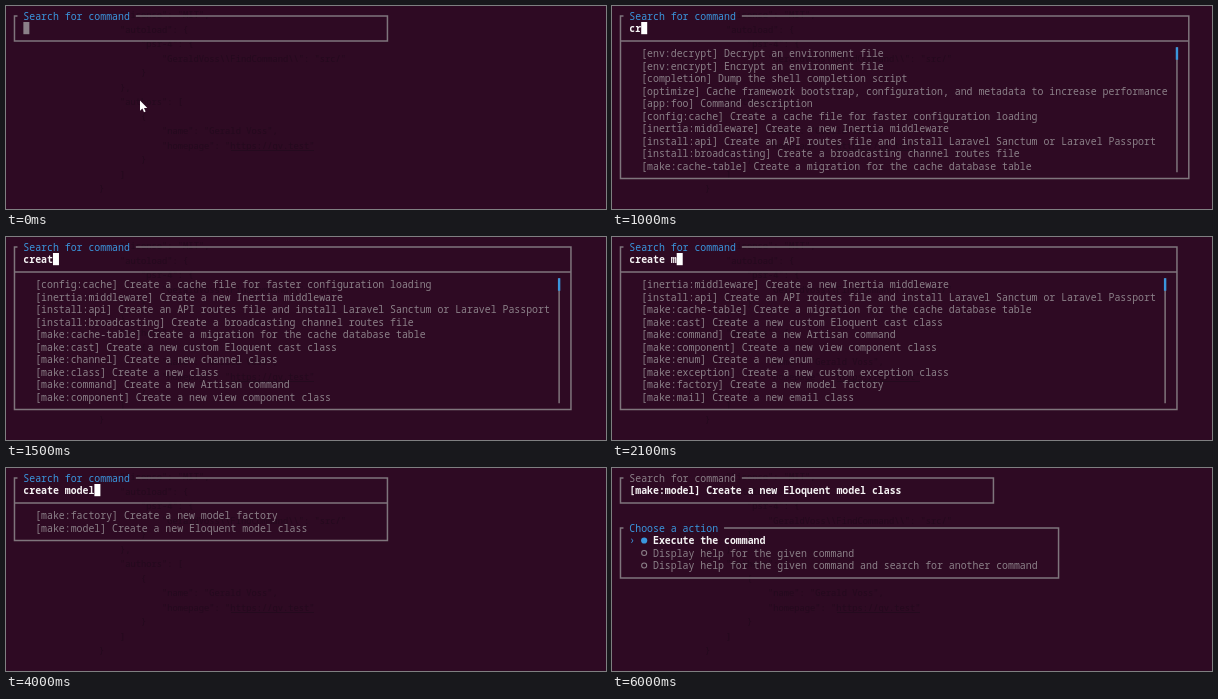
Animation, 600 px wide and 203 px high, one loop 6.5 s. Source, as an HTML page:

```html
<!DOCTYPE html>
<html lang="en">
<head>
<meta charset="utf-8">
<title>Search for command</title>
<style>
  html, body { margin: 0; width: 100%; height: 100%; overflow: hidden; background: #2e0a23; }
  svg { display: block; width: 600px; height: 203px; }
  text { font: 500 9.87px "Noto Sans Mono", "DejaVu Sans Mono", monospace; white-space: pre; }
  .dim { fill: #8b8088; }
  .blue { fill: #3a96dd; }
  .white { fill: #f6f4f5; font-weight: 700; }
  .ghost { fill: #240a1e; font-size: 8.77px; }
  .line { fill: none; stroke: #7f757c; stroke-width: 1.5; }
</style>
</head>
<body>
<svg id="stage" viewBox="0 0 600 203"></svg>
<script>
const LOOP = 6500, CELL = 5.92, ROW = 12.5, VISIBLE = 10;
const stage = document.getElementById('stage');

const commands = `clear-compiled|Remove the compiled class file
completion|Dump the shell completion script
docs|Access the Laravel documentation
optimize|Cache framework bootstrap, configuration, and metadata to increase performance
app:foo|Command description
auth:clear-resets|Flush expired password reset tokens
cache:clear|Flush the application cache
cache:forget|Remove an item from the cache
cache:prune-stale-tags|Prune stale cache tags from the cache (Redis only)
channel:list|List all registered private broadcast channels
config:cache|Create a cache file for faster configuration loading
env:decrypt|Decrypt an environment file
env:encrypt|Encrypt an environment file
inertia:middleware|Create a new Inertia middleware
install:api|Create an API routes file and install Laravel Sanctum or Laravel Passport
install:broadcasting|Create a broadcasting channel routes file
make:cache-table|Create a migration for the cache database table
make:cast|Create a new custom Eloquent cast class
make:channel|Create a new channel class
make:class|Create a new class
make:command|Create a new Artisan command
make:component|Create a new view component class
make:enum|Create a new enum
make:exception|Create a new custom exception class
make:factory|Create a new model factory
make:mail|Create a new email class
make:model|Create a new Eloquent model class`.split('\n').map(s => s.split('|'));

const actions = [
  'Execute the command',
  'Display help for the given command',
  'Display help for the given command and search for another command'
];

// Code showing faintly through the terminal: [indent, text]
const code = [
  [1, '"license": "MIT",'], [1, '"autoload": {'], [2, '"psr-4": {'],
  [3, '"GeraldVoss\\\\FindCommand\\\\": "src/"'], [2, '}'], [1, '},'],
  [1, '"authors": ['], [2, '{'], [3, '"name": "Gerald Voss",'],
  [3, '"homepage": "https://gv.test"'], [2, '}'], [1, ']'], [0, '}']
];

const steps = [
  { at: 0, query: '', pointer: true },
  { at: 600, query: 'c', right: 98 },
  { at: 900, query: 'cr' },
  { at: 1100, query: 'cre' },
  { at: 1500, query: 'creat' },
  { at: 1700, query: 'create' },
  { at: 1800, query: 'create ' },
  { at: 2000, query: 'create m' },
  { at: 2300, query: 'create mo' },
  { at: 2400, query: 'create mod' },
  { at: 2900, query: 'create mode' },
  { at: 3400, query: 'create model' },
  { at: 4100, query: 'create model', pick: 0 },
  { at: 4300, query: 'create model', pick: 1 },
  { at: 4800, done: true }
];

const colX = c => c * CELL - 0.4;
const midX = c => colX(c + 0.5);
const rowY = r => 10 + r * ROW;
const label = ([name, about]) => `[${name}] ${about}`;
const text = (col, row, str, cls) =>
  `<text x="${colX(col)}" y="${rowY(row) + 3.5}" class="${cls}">${str}</text>`;
const path = (d, extra = '') => `<path class="line" d="${d}" ${extra}/>`;

// Name matches come before description matches
function search(query) {
  const words = query.toLowerCase().split(' ').filter(Boolean);
  if (!words.length) return [];
  const hit = s => words.every(w => s.toLowerCase().includes(w));
  const byName = commands.filter(c => hit(c[0]));
  const byAbout = commands.filter(c => !hit(c[0]) && hit(c[1]));
  return [...byName, ...byAbout];
}

function box(top, bottom, right, title, cls) {
  const l = midX(1), r = midX(right), y = rowY(top);
  return path(`M${l + 3} ${y}H${l}V${rowY(bottom)}H${r}V${y}H${colX(4 + title.length)}`) +
    text(3, top, title, cls);
}

function backdrop() {
  const lines = code.map(([indent, str], i) =>
    `<text class="ghost" x="${93 + indent * 21}" y="${12 + i * 14.5}">${str}</text>`);
  return lines.join('') + '<path d="M225 144.5H308" stroke="#240a1e"/>';
}

function searchView({ query, pick, right, pointer }) {
  const found = search(query), shown = found.slice(0, VISIBLE);
  const longest = Math.max(0, ...shown.map(c => label(c).length));
  const edge = right || Math.max(64, longest + 8);
  let out = box(0, shown.length ? shown.length + 3 : 2, edge, 'Search for command', 'blue');
  out += text(3, 1, query, 'white');
  if (pick === undefined) {
    out += `<rect x="${colX(3 + query.length)}" y="16" width="6" height="12.2" fill="${query ? '#fff' : '#8b8088'}"/>`;
  }
  if (shown.length) out += path(`M${midX(1)} ${rowY(2)}H${midX(edge)}`);
  shown.forEach((c, i) => {
    out += text(5, i + 3, label(c), i === pick ? 'white' : 'dim');
    if (i === pick) out += text(3, i + 3, '›', 'blue');
  });
  if (found.length > VISIBLE) {
    const x = midX(edge - 2), y = rowY(2.5);
    out += path(`M${x} ${y}V${rowY(12.5)}`) +
      path(`M${x} ${y}v${ROW}`, 'style="stroke:#3a96dd;stroke-width:2.4"');
  }
  if (pointer) {
    out += '<path d="M134 94.5v10.3l2.4-2.2 1.6 3.7 1.6-.7-1.6-3.6h3.3z" fill="#fff"/>';
  }
  return out;
}

function actionView() {
  let out = box(0, 2, 64, 'Search for command', 'dim') +
    text(3, 1, label(commands[commands.length - 1]), 'white') +
    box(4, 8, 75, 'Choose a action', 'blue') + text(3, 5, '›', 'blue');
  actions.forEach((str, i) => {
    const at = `cx="${midX(5)}" cy="${rowY(i + 5)}"`;
    out += i ? `<circle ${at} r="2.5" fill="none" stroke="#8b8088" stroke-width="1.1"/>`
             : `<circle ${at} r="3.1" class="blue"/>`;
    out += text(7, i + 5, str, i ? 'dim' : 'white');
  });
  return out;
}

let current;
function frame() {
  const t = performance.now() % LOOP;
  const step = steps.filter(s => s.at <= t).pop();
  if (step !== current) {
    current = step;
    stage.innerHTML = backdrop() + (step.done ? actionView() : searchView(step));
  }
  requestAnimationFrame(frame);
}
frame();
</script>
</body>
</html>
```
